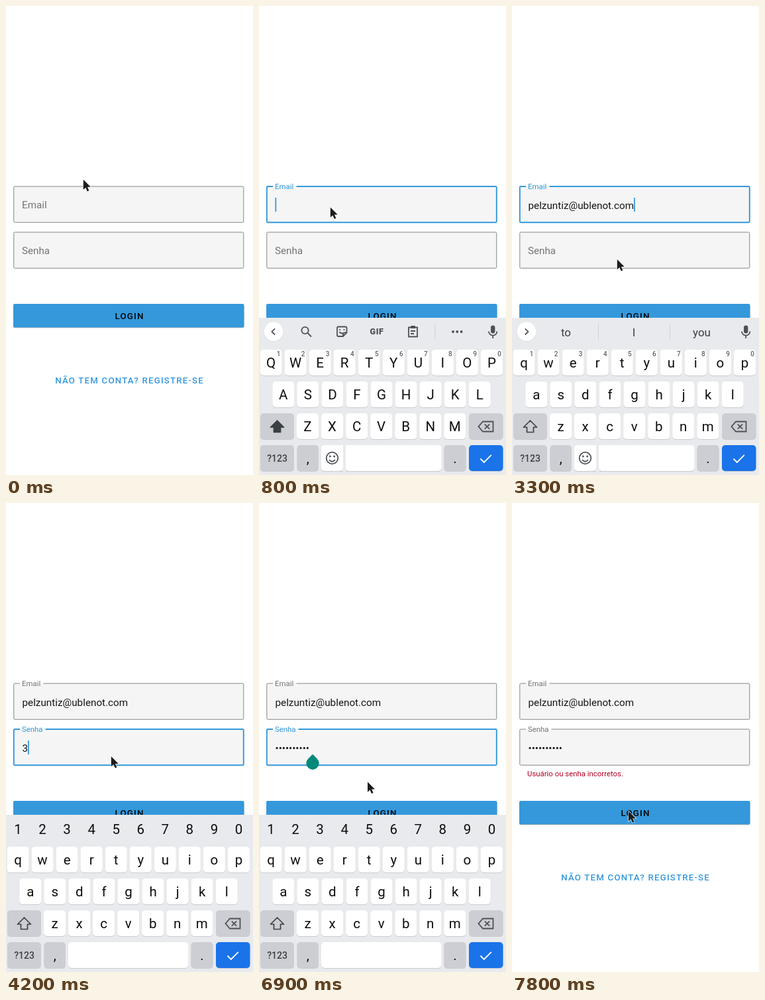
An HTML page for the animation above (8 s loop, 373 px wide and 707 px high).

```html
<!DOCTYPE html>
<html lang="pt">
<head>
<meta charset="utf-8">
<title>Login</title>
<style>
  html, body { margin: 0; width: 100%; height: 100%; overflow: hidden; background: #fff; }
  svg { display: block; width: 373px; height: 707px; font-family: Roboto, sans-serif; }
  text { white-space: pre; }
  .mid { text-anchor: middle; }
  .value { font-size: 15.25px; fill: #161616; }
  .caps { font-size: 13.3px; font-weight: 500; letter-spacing: 1.19px; text-anchor: middle; }
  .key { font-size: 20.5px; fill: #0e0e0e; text-anchor: middle; }
  .hint { font-size: 10px; font-weight: 500; fill: #5f6368; text-anchor: middle; }
  .sug { font-size: 17px; fill: #3c4043; text-anchor: middle; }
  .line { fill: none; stroke: #4d5156; stroke-width: 1.8; }
</style>
</head>
<body>
<svg id="stage" viewBox="0 0 373 707"></svg>
<script>
const LOOP = 8000, STEP = 100, HIDDEN = 240;
const BLUE = '#3498db', GRAY = '#757575';
const USER = 'pelzuntiz', HOST = '@ublenot.com', SECRET = '3925174086';

// [time, values...]: "hold" keeps the last row, "glide" blends between rows
const hold = (rows, t) => rows.filter(r => r[0] <= t).pop().slice(1);
function glide(rows, t) {
  const i = rows.findIndex(r => r[0] > t);
  if (i < 0) return rows[rows.length - 1].slice(1);
  const a = rows[i - 1], b = rows[i], k = (t - a[0]) / (b[0] - a[0]);
  return a.slice(1).map((v, j) => v + (b[j + 1] - v) * k);
}

const POINTER = [
  [0, 116.8, 261.8], [100, 115, 271], [200, 110, 291], [300, 107.8, 303.5], [2100, 107.8, 303.5],
  [2200, 94, 327.5], [2300, 104, 357], [2500, 150, 450], [2700, 184, 498], [2800, 184, 498],
  [3000, 179, 437], [3200, 163, 393], [3300, 158.8, 382], [6500, 158.8, 382],
  [6900, 164, 420.5], [7200, 168, 438], [7300, 168, 438], [7500, 176, 464.5]
];
const KEYBOARD_Y = [
  [0, HIDDEN], [500, 210], [600, 110], [700, 30], [800, 0],
  [6900, 0], [7000, 60], [7100, 170], [7200, HIDDEN]
];
const EMAIL = [
  [0, 0, 0], [1000, 1, 0], [1200, 1, 1], [1300, 2, 1], [1500, 3, 2], [1700, 3, 3], [2800, 21, 0]
];
// typed characters, last one readable
const PASSWORD = [
  [0, 0, 0], [4200, 1, 1], [4300, 2, 1], [4500, 3, 1], [4600, 4, 1], [4700, 4, 0], [5000, 6, 1],
  [5200, 7, 1], [5400, 8, 1], [5700, 9, 1], [5800, 10, 1], [6300, 10, 0]
];
const EMAIL_CARET = [[0, 0], [300, 1], [2200, 0], [2800, 1], [3500, 0]];
const PASSWORD_CARET = [[0, 0], [3500, 1], [4000, 0], [4200, 1], [6200, 0], [6400, 1], [6900, 0]];
const FOCUS = [[0, ''], [500, 'email'], [3500, 'password'], [7000, '']];
const TOOLBAR = [[0, 'tools'], [1200, 'words'], [3700, 'digits']];
const WORDS = [
  [0, 'p', 'pick', 'play'], [1500, 'pe', 'pet', 'peak'],
  [1700, 'pel', '', 'Pelzun'], [2800, 'to', 'I', 'you']
];

const text = (x, y, str, cls, more = '') => `<text x="${x}" y="${y}" class="${cls}" ${more}>${str}</text>`;
const path = (d, more = 'class="line"') => `<path d="${d}" ${more}/>`;
const group = (id, body, more = '') => `<g id="${id}" ${more}>${body}</g>`;
const keyCap = (x, y, w, fill = '#fff', id = '') =>
  `<rect x="${x}" y="${y + 1}" width="${w}" height="39" rx="5" fill="#c9cbcf"/>` +
  `<rect ${id && `id="${id}"`} x="${x}" y="${y}" width="${w}" height="39" rx="5" fill="${fill}"/>`;

function field(id, y, name) {
  return group(id, `
    <rect x="11.5" y="${y}" width="347.5" height="54.5" rx="2" fill="#f5f5f5"/>
    <path class="outline" fill="none"/>
    ${text(24, 0, name, 'label')}
    ${text(24.5, y + 34, '', 'value')}
    <rect class="underline" x="24.5" y="${y + 35.2}" height="1" fill="#161616"/>
    <rect class="caret" y="${y + 17}" width="1.8" height="21" fill="${BLUE}"/>`);
}

function letters() {
  const rows = [['qwertyuiop', 18, 518], ['asdfghjkl', 36.8, 566], ['zxcvbnm', 73.5, 614]];
  return rows.map(([chars, x0, y]) => [...chars].map((c, i) => {
    const x = x0 + 37.05 * i;
    return keyCap(x - 16.5, y, 33) + text(x, y + 27, c, 'key letter');
  }).join('')).join('');
}

const range = [...Array(10).keys()];
const chevron = (id, d) => path(d, `id="${id}" class="line"`);
const mic = `<rect x="350" y="481.5" width="6.4" height="12" rx="3.2" fill="#4d5156"/>` +
  path('M347 490.5a6.2 6.2 0 0 0 12.4 0M353.2 497v4');
const dividers = xs => xs.map(x => path(`M${x} 479.5v23`, 'stroke="#cdd0d4"')).join('');

const tools = group('tools', `
  <circle cx="69.5" cy="489" r="5.2" class="line"/>${path('M73.5 493l5.5 5.5')}
  ${path('M120 483.5h10.5q2 0 2 2v7l-5.5 5.5h-7q-2 0-2-2v-10.5q0-2 2-2M132 492.5h-3q-2 0-2 2v3M121.5 491q2 3.5 5 2')}
  <circle cx="122" cy="488" r="1.1" fill="#4d5156"/><circle cx="128.5" cy="488" r="1.1" fill="#4d5156"/>
  ${text(178, 495.2, 'GIF', 'mid', 'font-size="12.5" font-weight="900" fill="#4d5156" letter-spacing=".6"')}
  ${path('M226 484.5h13v14h-13zM229 490h7M229 494h5')}
  <rect x="229" y="482" width="7" height="4" rx="1" fill="#4d5156"/>
  ${path('M266 480.5v21', 'stroke="#cdd0d4"')}
  ${[293, 299.3, 305.6].map(x => `<circle cx="${x}" cy="491" r="1.9" fill="#4d5156"/>`).join('')}`);

const words = group('words', dividers([130.5, 238.5]) +
  [81.5, 184, 286.5].map(x => text(x, 497.5, '', 'sug word')).join('') +
  group('contact',
    text(184, 484, USER, 'mid', 'font-size="13.4" font-weight="500" fill="#3c4043"') +
    text(184, 500, HOST, 'mid', 'font-size="11.4" fill="#3c4043"')));

const keyboard = group('keyboard', `
  <rect y="470" width="373" height="240" fill="#e8eaed"/>
  ${group('bar', `<circle cx="22" cy="491.5" r="14.5" fill="#d9dbde"/><circle cx="22" cy="490.8" r="14.3" fill="#fff"/>
    ${chevron('back', 'M24 486.3l-4.6 4.6 4.6 4.6')}${chevron('forward', 'M19.8 486.3l4.6 4.6-4.6 4.6')}${mic}`)}
  ${tools}${words}
  ${group('digits', range.map(i => text(18 + 37.05 * i, 499, (i + 1) % 10, 'key')).join(''))}
  ${letters()}
  ${group('hints', range.map(i => text(29.6 + 37.05 * i, 528, (i + 1) % 10, 'hint')).join(''))}
  ${keyCap(2, 614, 51, '#ccced3')}${keyCap(317, 614, 51.5, '#ccced3')}
  ${path('M27.5 625l10 10h-5v7.5h-10v-7.5h-5z', 'id="shift" stroke="#3c4043" stroke-width="1.7" stroke-linejoin="round"')}
  ${path('M338 626.5h15.5v15h-15.5l-6.5-7.5zM340.8 630.3l7.4 7.4M348.2 630.3l-7.4 7.4')}
  ${keyCap(2, 662, 51, '#ccced3')}${keyCap(57.5, 662, 32.5, '#ccced3')}
  ${keyCap(94, 662, 181.5)}
  ${group('emoji', `<rect x="127" y="661" width="4" height="42" fill="#e8eaed"/>
    ${keyCap(94, 662, 33)}${keyCap(131, 662, 144.5)}
    <circle cx="110.5" cy="681.5" r="8.8" class="line"/>${path('M106 684q4.5 5.5 9 0')}
    <circle cx="107.3" cy="679" r="1.4" fill="#4d5156"/><circle cx="113.7" cy="679" r="1.4" fill="#4d5156"/>`)}
  ${keyCap(279.5, 662, 33, '#ccced3')}${keyCap(317, 662, 51.5, '#1a73e8')}
  ${text(27.5, 687, '?123', 'mid', 'font-size="14" font-weight="500" fill="#3c4043"')}
  ${text(73.7, 689, ',', 'key')}${text(296, 689, '.', 'key')}
  ${path('M334.5 682.5l5.3 5.3 11-11', 'fill="none" stroke="#fff" stroke-width="1.9"')}`);

const stage = document.getElementById('stage');
stage.innerHTML = `
  ${field('email', 272, 'Email')}${field('password', 341, 'Senha')}
  ${text(23, 411.8, 'Usuário ou senha incorretos.', '', 'id="error" font-size="11.4" fill="#b00020"')}
  <rect x="11" y="450.5" width="348.5" height="35.3" rx="2" fill="#000" opacity=".14"/>
  <rect x="11" y="450" width="348.5" height="35" rx="2" fill="#000" opacity=".18"/>
  <rect id="button" x="11" y="449" width="348.5" height="35.5" rx="2"/>
  ${text(186.6, 472.2, 'LOGIN', 'caps')}
  ${text(186.6, 569.2, 'NÃO TEM CONTA? REGISTRE-SE', 'caps', `fill="${BLUE}"`)}
  ${keyboard}
  ${path('M81 378.7l6.8 6.8a9.6 9.6 0 1 1 -13.6 0z', 'id="handle" fill="#00897b"')}
  ${path('M0 0V15.2L3.5 12L6 17.6L8.6 16.5L6.2 11H11Z', 'id="pointer" fill="#1c1c1c" stroke="#fff" stroke-width="1.1" paint-order="stroke"')}`;

const el = id => document.getElementById(id);
const show = (node, on) => node.setAttribute('display', on ? 'inline' : 'none');
const letterNodes = [...stage.querySelectorAll('.letter')];
const wordNodes = [...stage.querySelectorAll('.word')];

function drawField(id, y, gapEnd, { lift, focused, value, underline = 0, caret }) {
  const part = name => el(id).querySelector('.' + name);
  const right = 358.8, bottom = y + 54.2, left = 11.8;
  const start = lift ? gapEnd : 21, end = 21;
  const outline = part('outline'), label = part('label'), valueNode = part('value');
  outline.setAttribute('d', `M${start} ${y}H${right - 1.5}q1.5 0 1.5 1.5V${bottom - 1.5}q0 1.5 -1.5 1.5` +
    `H${left + 1.5}q-1.5 0 -1.5 -1.5V${y + 1.5}q0 -1.5 1.5 -1.5H${end}`);
  outline.setAttribute('stroke', focused ? BLUE : '#858585');
  outline.setAttribute('stroke-width', focused ? 1.9 : 1);
  label.setAttribute('y', y + 33.2 - 29.2 * lift);
  label.setAttribute('font-size', 15.2 - 3.8 * lift);
  label.setAttribute('fill', focused ? BLUE : GRAY);
  if (valueNode.textContent !== value) valueNode.textContent = value;
  const width = value ? valueNode.getComputedTextLength() : 0;
  const marked = underline ? valueNode.getSubStringLength(0, underline) : 0;
  part('underline').setAttribute('width', marked);
  part('caret').setAttribute('x', 24.4 + width);
  show(part('caret'), caret);
}

function draw(t) {
  const [focus] = hold(FOCUS, t), [mode] = hold(TOOLBAR, t);
  const [chars, underline] = hold(EMAIL, t), [typed, readable] = hold(PASSWORD, t);
  const masked = '•'.repeat(typed - readable) + (readable ? SECRET[typed - 1] : '');

  drawField('email', 272, 56.5, {
    lift: glide([[0, 0], [400, 0], [600, 1]], t)[0], focused: focus === 'email',
    value: (USER + HOST).slice(0, chars), underline, caret: hold(EMAIL_CARET, t)[0]
  });
  drawField('password', 341, 59.5, {
    lift: glide([[0, 0], [3400, 0], [3600, 1]], t)[0], focused: focus === 'password',
    value: masked, caret: hold(PASSWORD_CARET, t)[0]
  });

  const [offset] = glide(KEYBOARD_Y, t);
  show(el('keyboard'), offset < HIDDEN);
  el('keyboard').setAttribute('transform', `translate(0 ${offset})`);
  ['tools', 'words', 'digits'].forEach(id => show(el(id), id === mode));
  show(el('back'), mode === 'tools');
  show(el('forward'), mode === 'words');
  ['bar', 'hints', 'emoji'].forEach(id => show(el(id), mode !== 'digits'));

  const upper = t < 1000;
  letterNodes.forEach(n => {
    n.textContent = upper ? n.textContent.toUpperCase() : n.textContent.toLowerCase();
  });
  el('shift').setAttribute('fill', upper ? '#3c4043' : 'none');
  hold(WORDS, t).forEach((w, i) => wordNodes[i].textContent = w);
  show(el('contact'), t >= 1700 && t < 2800);

  show(el('handle'), t >= 6200 && t < 7100);
  show(el('error'), t >= 7700);
  el('button').setAttribute('fill', t === 7600 || t === 7700 ? '#3089c5' : BLUE);
  el('pointer').setAttribute('transform', `translate(${glide(POINTER, t).join(' ')})`);
}

const begin = performance.now();
function tick() {
  const t = (performance.now() - begin) % LOOP;
  draw(Math.floor(t / STEP) * STEP);
  requestAnimationFrame(tick);
}
tick();
</script>
</body>
</html>
```
